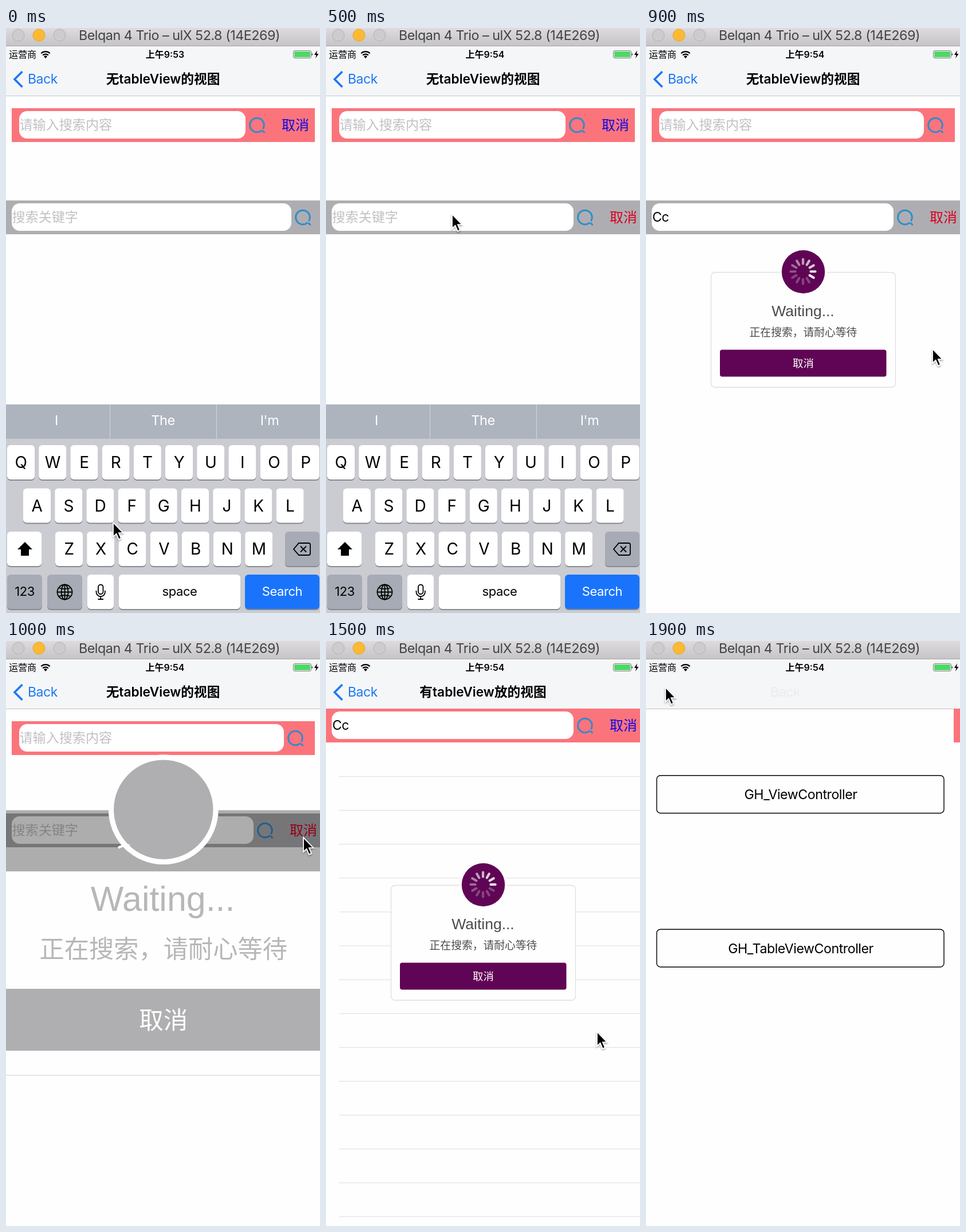
An HTML page that plays this animation: 548 by 1021 pixels, repeating every 2000 ms.

```html
<!DOCTYPE html>
<html lang="zh">
<head>
<meta charset="utf-8">
<title>Search bar demo</title>
<style>
html, body { margin: 0; width: 100%; height: 100%; overflow: hidden; background: #fefefe; }
svg { display: block; width: 548px; height: 1021px; }
text { font-family: Inter, "Noto Sans CJK SC", "Noto Sans CJK JP", "Noto Sans CJK", sans-serif; }
.latin { letter-spacing: -.02em; }
.helv { font-family: "Liberation Sans", Arial, sans-serif; }
</style>
</head>
<body>
<svg id="stage" viewBox="0 0 548 1021">
  <defs>
    <linearGradient id="chrome" x2="0" y2="1">
      <stop stop-color="#dddbdd"/><stop offset="1" stop-color="#c6c4c6"/>
    </linearGradient>
    <filter id="soft" x="-50%" y="-50%" width="200%" height="200%">
      <feDropShadow dx="0" dy="2" stdDeviation="1.5" flood-opacity=".35"/>
    </filter>
  </defs>
  <g id="view"></g>
  <g id="window">
    <rect width="548" height="31" fill="url(#chrome)"/>
    <path d="M0 31.5H548" stroke="#aaa8aa"/>
    <g stroke="#b3b1b3">
      <circle cx="21.5" cy="12.5" r="10.5" fill="#cdcbcd"/>
      <circle cx="57.5" cy="12.5" r="10.5" fill="#fdb932" stroke="#e5a32d"/>
      <circle cx="93.5" cy="12.5" r="10.5" fill="#cdcbcd"/>
    </g>
    <text class="latin" x="302.5" y="21" font-size="23.3" text-anchor="middle" fill="#444">Belqan 4 Trio – ulX 52.8 (14E269)</text>
    <text x="5" y="52" font-size="16">运营商</text>
    <g fill="none" stroke="#000" stroke-width="2.3">
      <path d="M61.3 44.2a11 11 0 0 1 15.4 0M64.2 47.5a7 7 0 0 1 9.6 0"/>
    </g>
    <path d="M69 53l-3-3.2a4.3 4.3 0 0 1 6 0z"/>
    <rect x="501.5" y="39.5" width="31" height="13" rx="2.5" fill="#fff" stroke="#777"/>
    <rect x="503" y="41" width="28" height="10" rx="1" fill="#4cd964"/>
    <path d="M533.5 44v4q2-.5 2-2t-2-2z" fill="#555"/>
    <path d="M543 39l-5 8h3.500l-1.500 6 5.500-8h-3.500z"/>
  </g>
  <g id="pointer" filter="url(#soft)">
    <path d="M0 0V25L5.600 19.800 9.800 29.500 14 27.700 9.900 18.200H17.500Z" stroke="#fff" stroke-width="1.800"/>
  </g>
</svg>
<script>
const STEP = 100, COUNT = 20;
const PINK = '#fb747c', BLUE = '#1c78f5', PLUM = '#600555', ASH = '#afafb1';

const view = document.getElementById('view');
const pointer = document.getElementById('pointer');

const rect = (x, y, w, h, fill, extra = '') =>
  `<rect x="${x}" y="${y}" width="${w}" height="${h}" fill="${fill}" ${extra}/>`;
const text = (s, x, y, size, fill = '#000', extra = '') =>
  `<text x="${x}" y="${y}" font-size="${size}" fill="${fill}" ${extra}>${s}</text>`;
const MID = 'text-anchor="middle"', LATIN = 'class="latin" ';

function searchBar(b) {
  const { x, y, w, fill, left, right, hint, typed, cancel, ink } = b;
  return rect(x, y, w, 59, fill) +
    rect(left, y + 5, right - left, 48, '#fff', 'rx="14"') +
    (typed ? text(typed, left + 1, y + 37, 23, '#000', LATIN)
           : text(hint, left + .5, y + 37, 23.1, '#c1c1c5')) +
    `<g transform="translate(${right + 20} ${y + 29.5})" fill="none" stroke="#2f8ccc" stroke-width="3">
      <circle r="12.3" stroke-dasharray="7 3 67.300"/><path d="M9.500 9.500L13.500 13.500"/></g>` +
    (cancel ? text('取消', x + w - cancel, y + 38, 24, ink) : '');
}

const topBar = (right, typed, cancel) => searchBar({
  x: 10, y: 140, w: 529, fill: PINK, left: 23, right, typed,
  hint: '请输入搜索内容', cancel: cancel && 58, ink: '#1208e6' });

const lowBar = (cancel, typed) => searchBar({
  x: 0, y: 301, w: 548, fill: '#aeaeb2', left: 10, right: cancel ? 432 : 498, typed,
  hint: '搜索关键字', cancel: cancel && 53, ink: '#d9001f' });

const tableBar = (cancel, typed) => searchBar({
  x: 0, y: 118, w: 548, fill: PINK, left: 10, right: cancel ? 432 : 498, typed,
  hint: '请输入搜索内容', cancel: cancel && 53, ink: '#1208e6' });

function keyboard() {
  const key = (x, y, w, label, fill = '#fff', ink = '#000', size = 22) =>
    rect(x, y + 2, w, 60, '#898b90', 'rx="6"') + rect(x, y, w, 60, fill, 'rx="6"') +
    text(label, x + w / 2, y + (size > 25 ? 40 : 36.5), size, ink, LATIN + MID);
  const row = (letters, x, y) =>
    [...letters].map((c, i) => key(x + i * 55.2, y, 48, c, '#fff', '#000', 28)).join('');
  const GREY = '#a6abb5';
  return rect(0, 657, 548, 60, '#aeb4be') + rect(0, 717, 548, 304, '#cbccd1') +
    '<path d="M181.500 657v60M367.500 657v60" stroke="#d3d6dc"/>' +
    ['I', 'The', "I'm"].map((s, i) => text(s, 88 + i * 186, 693, 23.5, '#fff', LATIN + MID)).join('') +
    row('QWERTYUIOP', 2, 728) + row('ASDFGHJKL', 30, 803.5) + row('ZXCVBNM', 86, 879) +
    key(2, 879, 60, '') + key(487, 879, 60, '', GREY) +
    key(2, 954, 61, '123', GREY) + key(72, 954, 61, '', GREY) + key(142, 954, 46, '') +
    key(197, 954, 212, 'space') + key(417, 954, 130, 'Search', '#1a74fb', '#fff') +
    '<path d="M33 897L46 910H40V921H26V910H20Z"/>' +
    `<g fill="none" stroke="#000" stroke-width="1.800">
      <path d="M511 899H528Q531 899 531 902V917Q531 920 528 920H511L502 909.500Z M514 904.500l10 10m0-10l-10 10"/>
      <circle cx="102.500" cy="984.500" r="13"/><ellipse cx="102.500" cy="984.500" rx="6" ry="13"/>
      <path d="M89.500 984.500h26M102.500 971.500v26M92 977q10.500 4 21 0M92 992q10.500-4 21 0"/>
      <rect x="161" y="971.500" width="8.500" height="16.500" rx="4.250"/>
      <path d="M157.500 982v2.500a7.700 7.700 0 0 0 15.400 0V982M165.200 992.500v4.500M160.500 997h9.500"/>
    </g>`;
}

function spinner(head) {
  let s = '';
  for (let i = 0; i < 12; i++) {
    const lag = (head - i + 24) % 12;
    s += `<path d="M0-13.500V-21.500" transform="rotate(${i * 30})" opacity="${Math.max(.25, 1 - lag * .1)}"/>`;
  }
  return `<g transform="translate(274 425)" stroke="#fff" stroke-width="4.200" stroke-linecap="round">${s}</g>`;
}

// ghost: the enlarged, drained look while the dialog goes away
function dialog(head, ghost) {
  const fill = ghost ? ASH : PLUM, ink = ghost ? '#b7b7b9' : '#4b4b4b';
  const box = ghost
    ? rect(113, 426, 322, 46.5, '#000', 'opacity=".32"') + rect(113, 472.5, 322, 154.5, '#fefefe') +
      rect(113, 626.8, 322, .6, '#dedee1')
    : rect(113.5, 426.5, 322, 200.5, '#fefefe', 'rx="7" stroke="#dfdfe3" stroke-width="1.300"');
  const body = box +
    `<circle cx="274.500" cy="425.500" r="41.700" fill="#fefefe"/><circle cx="274.500" cy="425.500" r="37.700" fill="${fill}"/>` +
    (ghost ? '' : spinner(head)) +
    text('Waiting...', 274, 502.5, 26.5, ink, 'class="helv" ' + MID) +
    text('正在搜索，请耐心等待', 274.5, 538, 18.8, ink, MID) +
    rect(129, 561.5, 290.500, 47, fill, 'rx="4"') +
    text('取消', 274.5, 592, 18.5, '#fff', 'font-weight="500" ' + MID);
  return ghost
    ? `<g transform="translate(274.300 526.500) scale(2.300) translate(-274.300 -526.500)">${body}</g>
       <path d="M196 361q8-5 20-4M208 360q3 4 7 6" fill="none" stroke="#fefefe" stroke-width="4"/>`
    : body;
}

function menu(dx) {
  const button = (y, label) =>
    rect(23.7 + dx, y + .7, 501.3, 65.8, '#fefefe', 'rx="6.500" stroke="#000" stroke-width="1.400"') +
    text(label, 275 + dx, y + 42, 23.2, '#000', LATIN + MID);
  return button(234, 'GH_ViewController') + button(502.5, 'GH_TableViewController');
}

function table(bar) {
  let lines = '';
  for (let i = 0; i < 14; i++) lines += `M23 ${(236.5 + i * 59.1).toFixed(1)}H548`;
  return rect(0, 118, 548, 903, '#fefefe') + `<path d="${lines}" stroke="#dddde1"/>` + bar;
}

function header(title, clock) {
  return rect(0, 31, 548, 87, '#f5f6f8') + '<path d="M0 118.500H548" stroke="#c3c3c7"/>' +
    text('上午' + clock, 277.5, 52, 16, '#000', 'font-weight="600" ' + MID) +
    (title ? `<path d="M28.500 76L15 89.500L28.500 103" fill="none" stroke="${BLUE}" stroke-width="3.600"/>` +
      text('Back', 38, 97, 23, BLUE, LATIN) +
      text(title, 274, 97, 22.7, '#000', 'font-weight="600" ' + MID) : '');
}

const both = (top, low, extra = '') => ({ title: '无tableView的视图', art: () => topBar(...top) + lowBar(...low) + extra });
const list = (cancel, typed, extra = '') => ({ title: '有tableView放的视图', art: () => table(tableBar(cancel, typed)) + extra });
const keys = keyboard();
const open = [418, '', true], filled = [418, 'Xxv', true], closed = [485, '', false];

// each scene: picture plus pointer position
const scenes = [
  [both(open, [false], keys), 187, 863],
  [both(filled, [false], keys), 470, 975],
  [both(filled, [false], dialog(7)), 387, 293],
  [both(filled, [false], dialog(1)), 290, 580],
  [both(open, [false]), 260, 420],
  [both(open, [true], keys), 220, 325],
  [both(open, [true], keys), 440, 200],
  [both([424, '', false], [true], keys), 514, 163],
  [both(closed, [true, 'Cc'], keys), 475, 970],
  [both(closed, [true, 'Cc'], dialog(4)), 500, 560],
  [both(closed, [true], dialog(0, true)), 519, 343],
  [both(closed, [false]), 40, 90],
  [{ art: () => menu(0) }, 207, 540],
  [list(false, ''), 210, 150],
  [list(true, 'Cc', keys), 475, 970],
  [list(true, 'Cc', dialog(3)), 473, 682],
  [list(true, 'Cc', dialog(9)), 290, 580],
  [list(true, ''), 512, 148],
  [list(false, ''), 34, 81],
  [{ art: () => menu(-5) + `<g transform="translate(537)">${table(rect(0, 118, 548, 59, PINK))}</g>` +
      text('Back', 243, 97, 23, '#000', 'opacity=".04" ' + LATIN + MID) }, 34, 81]
];

let shown = -1;
const start = performance.now();
function draw() {
  const i = Math.floor(Math.max(0, performance.now() - start) / STEP) % COUNT;
  if (i !== shown) {
    shown = i;
    const [scene, x, y] = scenes[i];
    view.innerHTML = rect(0, 0, 548, 1021, '#fefefe') +
      header(scene.title, i < 5 ? '9:53' : '9:54') + scene.art();
    pointer.setAttribute('transform', `translate(${x} ${y})`);
  }
  requestAnimationFrame(draw);
}
draw();
</script>
</body>
</html>
```
